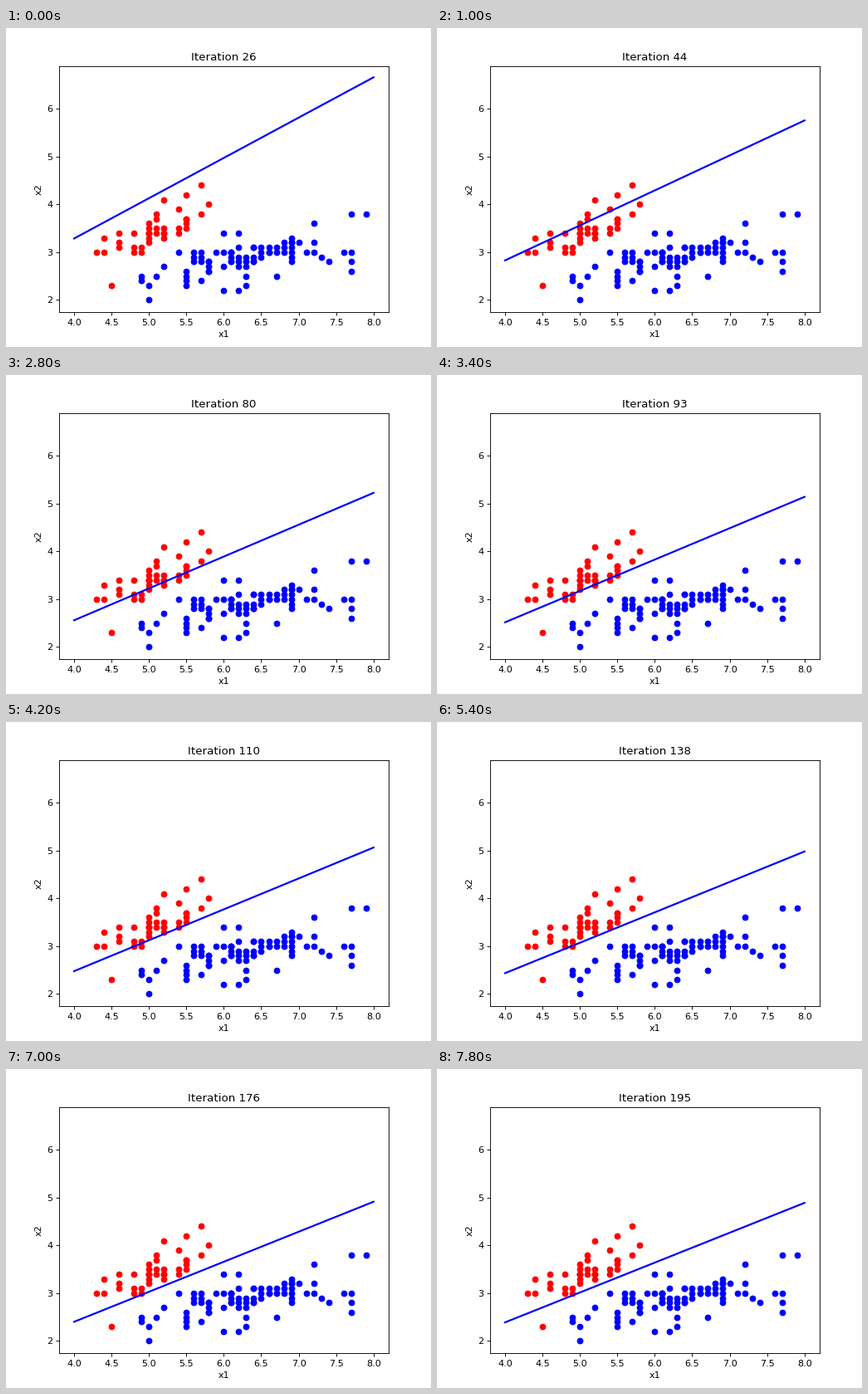
Write a matplotlib script that moves like this. It is 512x384 px and loops after 8000 ms.

```python
import numpy as np
import matplotlib.pyplot as plt
from matplotlib.animation import FuncAnimation

plt.rcParams["font.family"] = "DejaVu Sans"

FRAMES, INTERVAL = 40, 200
rng = np.random.default_rng(4)


# Samples sit on a 0.1 grid, so positions are counted in tenths.
def block(x, y, nx=1, ny=1, sx=1, sy=1):
    return [(x + i * sx, y + j * sy) for i in range(nx) for j in range(ny)]


def diagonal(x, y, slope, n=3):
    return [(x + i, y + i * slope) for i in range(n)]


def strays(n, x0, x1, y0, slope, spread):
    x = rng.integers(x0, x1 + 1, n)
    y = np.rint(y0 + slope * (x - x0) + rng.normal(0, spread, n))
    return list(zip(x, y))


def red_class():
    outer = [(45, 23), (52, 41), (55, 42), (54, 39), (57, 38), (57, 44), (58, 40)]
    return (outer + block(43, 30, nx=2) + block(46, 31, ny=2)
            + block(48, 30, 2, 2) + block(46, 34, nx=5, sx=2)
            + block(50, 32, ny=5) + block(51, 34, 2, 2) + block(51, 37, ny=2)
            + strays(8, 44, 55, 31, 0.5, 1.2))


def blue_class():
    outer = [(50, 20), (54, 30), (67, 25), (72, 32), (72, 36), (77, 38), (79, 38)]
    return (outer + block(49, 24, ny=2) + diagonal(50, 23, 2)
            + block(55, 23, ny=4) + block(56, 28, 2, 3) + block(58, 26, ny=3)
            + block(61, 28, 4, 2) + block(59, 30, nx=3)
            + block(61, 30, nx=4, sx=5) + block(65, 30, nx=4)
            + block(60, 22, 2, 2, 2, 12) + block(63, 23, ny=3, sy=2)
            + block(68, 32, nx=3) + diagonal(72, 30, -1)
            + block(77, 26, ny=3, sy=2)
            + strays(22, 56, 69, 26, 0.45, 1.6))


def iteration(frame):
    return round(26 + 3.586 * frame + 0.0224 * frame**2 - 0.000079 * frame**3)


def boundary(n):
    """Heights at x1 = 4 and x1 = 8, settling roughly like 1 / n."""
    right = np.polyval([-5167, 586, 36.34, 4.689], 1 / n)
    left = 2.388 + 0.507 * (right - 4.89)
    return left, right


fig, ax = plt.subplots(figsize=(6.4, 4.8), dpi=80)
for points, color in ((red_class(), "red"), (blue_class(), "blue")):
    ax.scatter(*np.array(points).T / 10, s=36, color=color)
line, = ax.plot([4, 8], boundary(iteration(0)), color="blue", lw=2)
ax.set_xlim(3.8, 8.2)
ax.set_ylim(1.7485, 6.8908)
ax.set_xticks(np.arange(4, 8.1, 0.5))
ax.set_yticks(range(2, 7))
ax.set_xlabel("x1")
ax.set_ylabel("x2")
title = ax.set_title("")


def update(frame):
    n = iteration(frame)
    line.set_ydata(boundary(n))
    title.set_text(f"Iteration {n}")
    return line, title


anim = FuncAnimation(fig, update, frames=FRAMES, interval=INTERVAL,
                     repeat=True, repeat_delay=0, blit=False)
plt.show()
```
